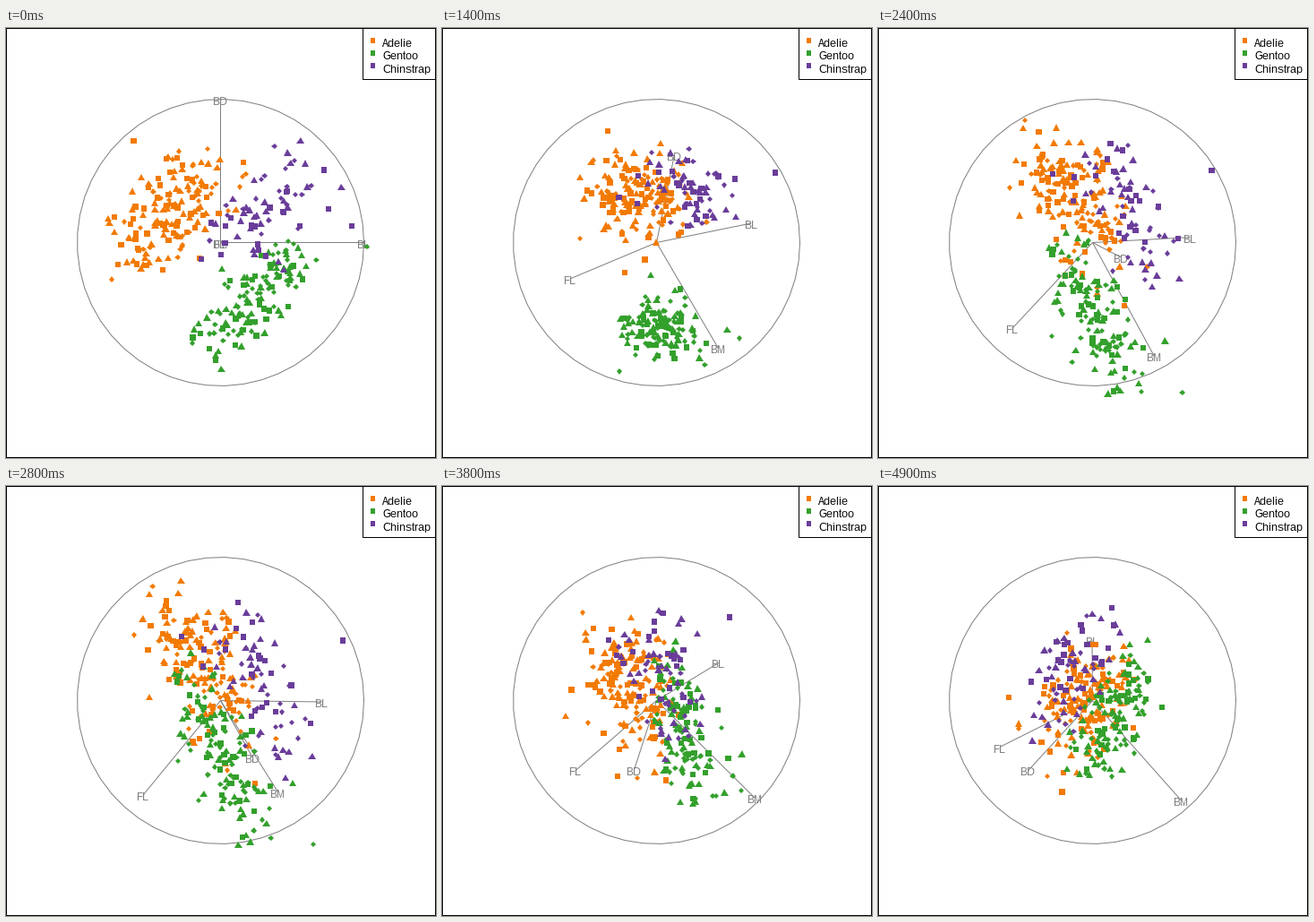
A matplotlib script for the animation above (5 s loop, 480 by 480 pixels).

```python
import matplotlib.pyplot as plt
import numpy as np
from matplotlib.animation import FuncAnimation
from matplotlib.collections import LineCollection, PolyCollection
from matplotlib.patches import Polygon, Rectangle

plt.rcParams.update({
    "font.family": "Liberation Sans", "text.hinting": "default",
    "text.hinting_factor": 1, "toolbar": "None",
})

SIZE, MIDDLE, RADIUS, SCALE = 480, 239.5, 160, 56.8
FRAMES, INTERVAL = 50, 100
GREY = "#7f7f7f"
PX = 0.75  # points per pixel at 96 dpi
VARIABLES = ("BL", "BD", "FL", "BM")
DEVIATION = 0.55  # spread inside a group, in overall standard deviations

# Colour, count, correlation, mean, farthest member and its marker.
GROUPS = {
    "Adelie": ("#f27a00", 151, 0.42, (-.94, .61, -.78, -.63), (-1.71, 2, -.21, .25), "square"),
    "Gentoo": ("#33a02c", 123, 0.68, (.66, -1.1, 1.16, 1.09), (2.87, -.08, 2.07, 2.3), "diamond"),
    "Chinstrap": ("#6a3d9a", 68, 0.58, (.9, .64, -.36, -.58), (2.58, .33, -1.42, -.63), "square"),
}

# Tour stops: frame, then the horizontal and vertical weight of each variable.
STOPS = [
    (0, (1, 0, 0, 0), (0, 1, 0, 0)),
    (15, (.61, .13, -.63, .46), (.14, .56, -.26, -.78)),
    (30, (.72, .25, -.51, .40), (-.05, -.54, -.65, -.55)),
    (46, (.05, -.57, -.49, .66), (.58, -.39, -.33, -.62)),
    (49, (0, -.45, -.65, .61), (.42, -.49, -.33, -.69)),
]


def marker(corners, radius, start):
    """Four corners on a circle; a triangle repeats its first one."""
    angle = np.radians(start) + 2 * np.pi * np.arange(4) / corners
    return radius * np.column_stack([np.cos(angle), -np.sin(angle)])


MARKERS = {
    "square": marker(4, 3.15 * np.sqrt(2), 45),
    "triangle": marker(3, 4.9, 90),
    "diamond": marker(4, 3.15, 90),
}


def standardise(values):
    return (values - values.mean(0)) / values.std(0)


def make_group(rng, count, correlation, mean, farthest):
    """Members of two sizes around the mean, correlated through their size."""
    sexes = np.where(np.arange(count) % 2, 1, -1)
    size = standardise(0.8 * sexes + 0.6 * rng.normal(size=count))
    own = standardise(np.clip(rng.normal(size=(count, 4)), -2.3, 2.3))
    members = np.sqrt(correlation) * size[:, None] + np.sqrt(1 - correlation) * own
    members = np.array(mean) + DEVIATION * members
    members[0] = farthest
    return members


def orthonormal(matrix):
    u, _, vt = np.linalg.svd(matrix, full_matrices=False)
    return u @ vt


def travel(a, b, t):
    """Geodesic from one projection plane to another."""
    u, cosines, vt = np.linalg.svd(a.T @ b)
    p, q = a @ u, b @ vt.T
    cosines = np.clip(cosines, -1, 1 - 1e-9)
    angles = np.arccos(cosines)
    heading = (q - p * cosines) / np.sin(angles)
    turn = u @ vt
    spin = t * np.arctan2(turn[1, 0], turn[0, 0])
    c, s = np.cos(spin), np.sin(spin)
    moved = (p * np.cos(t * angles) + heading * np.sin(t * angles)) @ u.T
    return orthonormal(moved @ np.array([(c, -s), (s, c)]))


TIMES = [stop[0] for stop in STOPS]
PLANES = [orthonormal(np.array(stop[1:]).T) for stop in STOPS]


def projection(frame):
    i = max(1, int(np.searchsorted(TIMES, frame)))
    t = (frame - TIMES[i - 1]) / (TIMES[i] - TIMES[i - 1])
    return travel(PLANES[i - 1], PLANES[i], t)


def to_stage(points, scale):
    return MIDDLE + points * (scale, -scale)


rng = np.random.default_rng(11)
clouds, outlines, colours = [], [], []
for colour, count, correlation, mean, farthest, symbol in GROUPS.values():
    clouds.append(make_group(rng, count, correlation, mean, farthest))
    symbols = [symbol, *rng.choice(list(MARKERS), count - 1)]
    outlines += [MARKERS[name] for name in symbols]
    colours += [colour] * count
cloud, outlines = np.vstack(clouds), np.array(outlines)

fig = plt.figure(figsize=(5, 5), dpi=96, facecolor="white")
ax = fig.add_axes((0, 0, 1, 1))
ax.set(xlim=(0, SIZE), ylim=(SIZE, 0))
ax.axis("off")

theta = np.linspace(0, 2 * np.pi, 50)
circle = to_stage(np.column_stack([np.cos(theta), np.sin(theta)]), RADIUS)
ax.add_patch(Polygon(circle, fill=False, ec=GREY, lw=PX, zorder=1))
spokes = LineCollection([], colors=GREY, linewidths=PX, zorder=2)
spokes.set_snap(False)
ax.add_collection(spokes)
labels = [ax.text(0, 0, name, color=GREY, fontsize=12 * PX, ha="center",
                  va="baseline", zorder=3) for name in VARIABLES]
dots = PolyCollection(outlines, facecolors=colours, edgecolors="none", zorder=4)
ax.add_collection(dots)


def add_box(x, y, width, height, fill, z):
    ax.add_patch(Rectangle((x, y), width, height, fc=fill, ec="black", lw=PX,
                           zorder=z, clip_on=False))


add_box(0, 0, 479, 479, "none", 0)
add_box(398, 0, 81, 57, "white", 5)
for row, (name, group) in enumerate(GROUPS.items()):
    ax.add_patch(Rectangle((407, 14 * row + 11), 5, 6, fc=group[0], ec="none", zorder=6))
    ax.text(420, round(21 + 14.4 * row), name, fontsize=12 * PX, color="black",
            va="baseline", zorder=6)


def update(frame):
    plane = projection(frame)
    tips = to_stage(plane, RADIUS)
    spokes.set_segments([[(MIDDLE, MIDDLE), tip] for tip in tips])
    for label, (x, y) in zip(labels, tips):
        label.set_position((x - 1, y + 6))
    spots = to_stage(cloud @ plane, SCALE)
    dots.set_verts(np.round(spots[:, None, :] + outlines))
    return [spokes, dots, *labels]


animation = FuncAnimation(fig, update, frames=FRAMES, interval=INTERVAL,
                          repeat=True, repeat_delay=0, blit=False)
plt.show()
```
